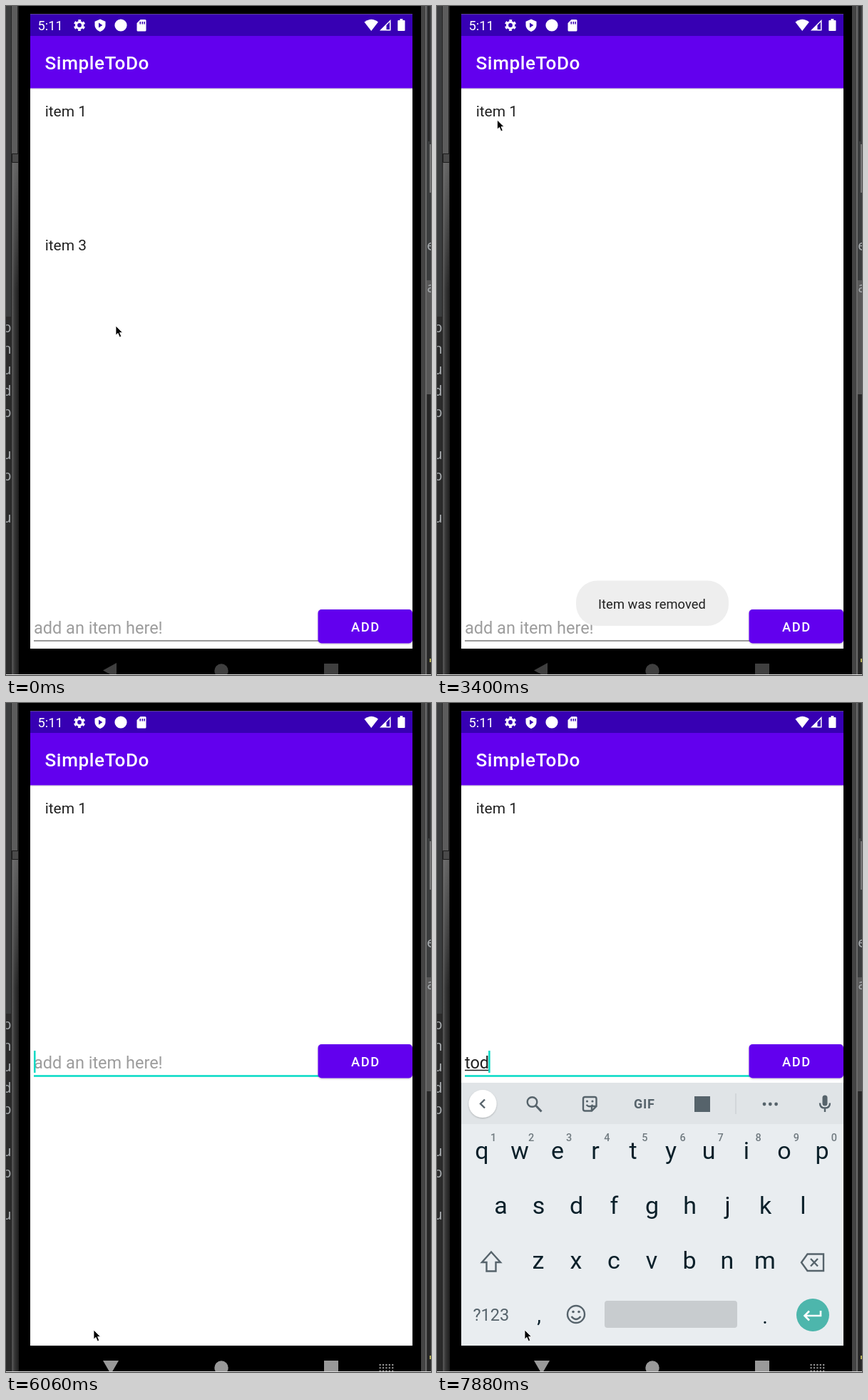
Animation, 596 px wide and 939 px high, one loop 8 s. Source, as an HTML page:

```html
<!DOCTYPE html>
<html lang="en">
<head>
<meta charset="utf-8">
<title>To-do list</title>
<style>
html, body { margin: 0; width: 100%; height: 100%; overflow: hidden; background: #000; }
svg { display: block; width: 596px; height: 939px; font-family: Roboto, sans-serif; }
.mono { font: 20px "Noto Sans Mono", monospace; fill: #a5a9ac; }
.line { fill: none; stroke: #56636b; stroke-width: 2.4; }
.medium { font-weight: 500; }
</style>
</head>
<body>
<svg viewBox="0 0 596 939">
  <defs>
    <linearGradient id="edge">
      <stop offset="0" stop-color="#111"/><stop offset=".15" stop-color="#5a5a5a"/>
      <stop offset=".4" stop-color="#383838"/><stop offset="1" stop-color="#181818"/>
    </linearGradient>
    <linearGradient id="shine" x2="0" y2="1">
      <stop offset="0" stop-color="#777" stop-opacity=".75"/><stop offset="1" stop-color="#777" stop-opacity="0"/>
    </linearGradient>
    <clipPath id="screen"><path d="M34 11.500H570V902H34z"/></clipPath>
    <clipPath id="nav"><path d="M34 902H570V938H34z"/></clipPath>
    <filter id="shadow" x="-20%" y="-20%" width="140%" height="150%">
      <feDropShadow dx="0" dy="1" stdDeviation="1.1" flood-opacity=".25"/>
    </filter>
  </defs>

  <!-- desktop and phone body -->
  <path fill="#2b2b2b" d="M0 0H596V939H0z"/>
  <path fill="#3b3d3e" d="M0 0H9V400H0zM0 400H9V436H0zM588 0H596V385H588z"/>
  <path fill="#585858" d="M588 385H596V545H588z"/>
  <path fill="url(#edge)" d="M7 0H19V939H7z"/>
  <path fill="#5c5c5c" d="M8 0H16V207H8z"/>
  <path fill="url(#shine)" d="M9 219H17V400H9z"/>
  <path fill="#4a4a4a" stroke="#1b1b1b" d="M8.500 207.500H17.500V219.500H8.500z"/>
  <path fill="#444" d="M582 0H590V939H582z"/>
  <path fill="#6a6a6a" d="M588 0H590V939H588z"/>
  <path fill="#252525" d="M592 0H594V190H592zM592 545H594V939H592z"/>
  <path fill="#777" d="M594 194H596V262H594z"/>
  <path fill="#b3ad57" d="M594 916H596V921H594z"/>
  <g id="code" class="mono" text-anchor="end"></g>
  <path d="M18 0H582V939H18z"/>

  <g clip-path="url(#screen)">
    <path fill="#fff" d="M34 11H570V902H34z"/>
    <path fill="#6200ee" d="M34 42H570V115.500H34z"/>
    <path fill="#3700b3" d="M34 11H570V42H34z"/>
    <path fill="#000" opacity=".12" d="M34 115.500H570V117H34z"/>
    <g fill="#fff">
      <text x="44.500" y="34" font-size="18.300">5:11</text>
      <text x="54.500" y="89" font-size="26.100" letter-spacing=".6" class="medium">SimpleToDo</text>
      <g fill="none" stroke="#fff">
        <circle cx="103" cy="27" r="4.500" stroke-width="3.200"/>
        <circle cx="103" cy="27" r="6.700" stroke-width="2.800" stroke-dasharray="3.700 3.316" stroke-dashoffset="-1.660"/>
      </g>
      <path d="M132 18.500l7.500 3.200v5c0 4.200-3 7.500-7.500 9.200c-4.500-1.700-7.500-5-7.500-9.200v-5z"/>
      <path fill="#3700b3" d="M130 23.500v7l5.300-3.500z"/>
      <circle cx="161" cy="27" r="8.600"/>
      <path d="M188.500 19H195q1.500 0 1.500 1.500V34q0 1.500-1.500 1.500H185q-1.500 0-1.500-1.500V24z"/>
      <path fill="#3700b3" d="M187.500 22h1.500v3.500h-1.500zM190.500 22h1.500v3.500h-1.500zM193.300 22h1.500v3.500h-1.500z"/>
      <path d="M502.500 22.500q9.700-7.500 19.400 0L512.200 35z"/>
      <path d="M539.500 19v15.500H524zM538 22.600L533.500 27v6H538z" fill-rule="evenodd"/>
      <path d="M552.500 18h3.800v2h2.200q1 0 1 1v13q0 1-1 1h-8.200q-1 0-1-1V21q0-1 1-1h2.200z"/>
    </g>

    <g fill="#202020" font-size="20.900">
      <text x="54.700" y="155">item 1</text>
      <text id="item3" x="54.700" y="343">item 3</text>
    </g>

    <g id="field">
      <text id="hint" x="39" y="881" font-size="23.500">add an item here!</text>
      <text id="typed" x="39" y="881" font-size="23.500" fill="#202020"></text>
      <path id="spell" stroke="#202020" stroke-width="1.500"/>
      <path id="rule"/>
      <rect id="caret" y="856" width="2.500" height="31" fill="#03dac5"/>
      <rect x="437.500" y="847" width="132.500" height="47.500" rx="5" fill="#6200ee" filter="url(#shadow)"/>
      <text x="484" y="878" font-size="18.300" letter-spacing="1.630" fill="#fff" class="medium">ADD</text>
    </g>

    <g id="toast">
      <rect x="195" y="806.500" width="214" height="63.500" rx="30" fill="#eee"/>
      <text x="226" y="846" font-size="18.300" letter-spacing=".08" fill="#202020">Item was removed</text>
    </g>

    <g id="keyboard">
      <path fill="#e9edf0" d="M34 533H570V1100H34z"/>
      <path fill="#e0e4e7" d="M34 533H570V591H34z"/>
      <circle cx="64" cy="562.500" r="19.500" fill="#fff" filter="url(#shadow)"/>
      <g class="line">
        <path d="M67 556.500l-6 6l6 6"/>
        <circle cx="133.500" cy="560" r="6.800"/>
        <path d="M138.500 565l8 8.500" stroke-width="3"/>
        <path d="M207.500 553H221q2.500 0 2.500 2.500V566l-6.500 6.500H207.500q-2.500 0-2.500-2.500V555.500q0-2.500 2.500-2.500zM223 566h-6v6M209.500 564q4.500 4.500 9 0"/>
        <path d="M537 561.500q0 7 7 7t7-7M544 568.500v5.500"/>
        <path d="M76 770.500L63 785h6.500v12.500h13V785H89z"/>
        <path d="M519.500 773.500H542V797H519.500L511 785.200zM524 780l10 10.500m0-10.500l-10 10.500"/>
        <circle cx="195" cy="858" r="12"/>
        <path d="M188.500 861q6.500 8 13 0"/>
      </g>
      <g fill="#56636b">
        <circle cx="210.500" cy="559" r="1.600"/><circle cx="218" cy="559" r="1.600"/>
        <text x="276" y="569" font-size="18" font-weight="700" letter-spacing=".8">GIF</text>
        <rect x="361" y="552" width="22" height="22"/>
        <circle cx="459" cy="563" r="2.400"/><circle cx="467.300" cy="563" r="2.400"/><circle cx="475.600" cy="563" r="2.400"/>
        <rect x="540.500" y="550.500" width="7" height="15" rx="3.500"/>
        <circle cx="191" cy="854.500" r="1.800"/><circle cx="199" cy="854.500" r="1.800"/>
        <text x="50.500" y="867" font-size="23.500">?123</text>
      </g>
      <path stroke="#c4c9cc" d="M419 548V577"/>
      <rect x="235" y="839" width="186" height="38" rx="4" fill="#c8cccf"/>
      <circle cx="527" cy="859" r="23" fill="#4db6ac"/>
      <path fill="none" stroke="#fff" stroke-width="2.600" d="M538 853v7H516M522 853.500l-6.500 6.500l6.500 6.500"/>
      <g id="keys" text-anchor="middle" fill="#0b202a" font-size="34"></g>
    </g>
  </g>

  <g id="navKeys" clip-path="url(#nav)">
    <path id="back"/>
    <circle cx="302" cy="933" r="9.700"/>
    <path d="M446 923H466V943H446z"/>
    <path id="switcher" fill="none" stroke="#999" stroke-width="2" stroke-dasharray="2.200 2.200" d="M523.500 929H544M523.500 933.200H544M523.500 937.400H544"/>
  </g>
  <path fill="#dedede" d="M0 938H596V939H0z"/>
  <path id="pointer" stroke="#fff" stroke-width=".8" d="M0 0V13L3 10.300L5.300 15.700L7.700 14.700L5.500 9.500H9.500z"/>
</svg>
<script>
const LOOP = 8000;
const $ = id => document.getElementById(id);
const set = (id, attrs) => {
  for (const name in attrs) $(id).setAttribute(name, attrs[name]);
};
const show = (id, on) => set(id, { visibility: on ? "visible" : "hidden" });
const label = (text, x, y, more = "") => `<text x="${x}" y="${y}" ${more}>${text}</text>`;

// Share of a stepped change done by time t; the first step lands at start, the last at end.
const steps = (t, start, end, n) => t < start ? 0 :
  Math.min(n, Math.floor((t - start) / (end - start) * (n - 1) + 1.001)) / n;

const rows = [["qwertyuiop", 63, 640], ["asdfghjkl", 89.500, 717], ["zxcvbnm", 142, 794]];
$("keys").innerHTML = rows.map(([row, x, y]) =>
  [...row].map((key, i) => label(key, x + 53 * i, y)).join("")).join("") +
  [..."1234567890"].map((n, i) =>
    label(n, 79 + 53.100 * i, 615, 'font-size="14.5" fill="#717b81" class="medium"')).join("") +
  label(",", 143, 869, 'font-size="29"') + label(".", 460, 871, 'font-size="29"');

$("code").innerHTML = [..."pnudp up u"].map((c, i) => label(c, 7.500, 458 + 29.700 * i)).join("") +
  label("e", 602, 343) + label("a", 602, 402);

// start, end, number of steps, x, y
const moves = [
  [500, 1040, 5, 86, 331],
  [2980, 3400, 4, 84.500, 160],
  [3680, 3681, 1, 83.500, 159],
  [3970, 4490, 4, 123, 880]
];

function pointerAt(t) {
  let x = 154, y = 449;
  for (const [start, end, n, toX, toY] of moves) {
    const k = steps(t, start, end, n);
    x += (toX - x) * k;
    y += (toY - y) * k;
  }
  return `translate(${x} ${y})`;
}

function draw(t) {
  const focused = t >= 4830, raised = t >= 5800;
  const text = "tod".slice(0, Math.round(3 * steps(t, 7480, 7880, 3)));
  const caretOn = focused && !(t >= 5510 && t < 6060) && !(t >= 6480 && t < 7050);

  set("pointer", { transform: pointerAt(t) });
  show("item3", t < 2030);
  set("toast", { opacity: steps(t, 2030, 2400, 4) - steps(t, 4142, 4314, 2) });

  set("field", { transform: `translate(0 ${raised ? -368 : 0})` });
  set("hint", { fill: focused && t < 5230 ? "#737373" : "#9d9d9d" });
  show("hint", !text);
  $("typed").textContent = text;
  const end = 39 + (text ? $("typed").getComputedTextLength() : 0);
  set("spell", { d: `M39 883.500H${end}` });
  show("spell", text);
  set("caret", { x: text ? end - 1 : 39 });
  show("caret", caretOn);
  set("rule", focused
    ? { d: "M39 891.500H440", stroke: "#03dac5", "stroke-width": 2.600 }
    : { d: "M39 891H440", stroke: "#777", "stroke-width": 1.300 });

  show("keyboard", t >= 6210);
  set("keyboard", { transform: `translate(0 ${t < 6360 ? 90 : 0})` });
  set("navKeys", { fill: raised ? "#999" : "#3f3f3f" });
  set("back", { d: raised ? "M136 923H158L147 942z" : "M136 932.500L155 922V943z" });
  show("switcher", raised);
}

function tick() {
  draw(performance.now() % LOOP);
  requestAnimationFrame(tick);
}
tick();
</script>
</body>
</html>
```
